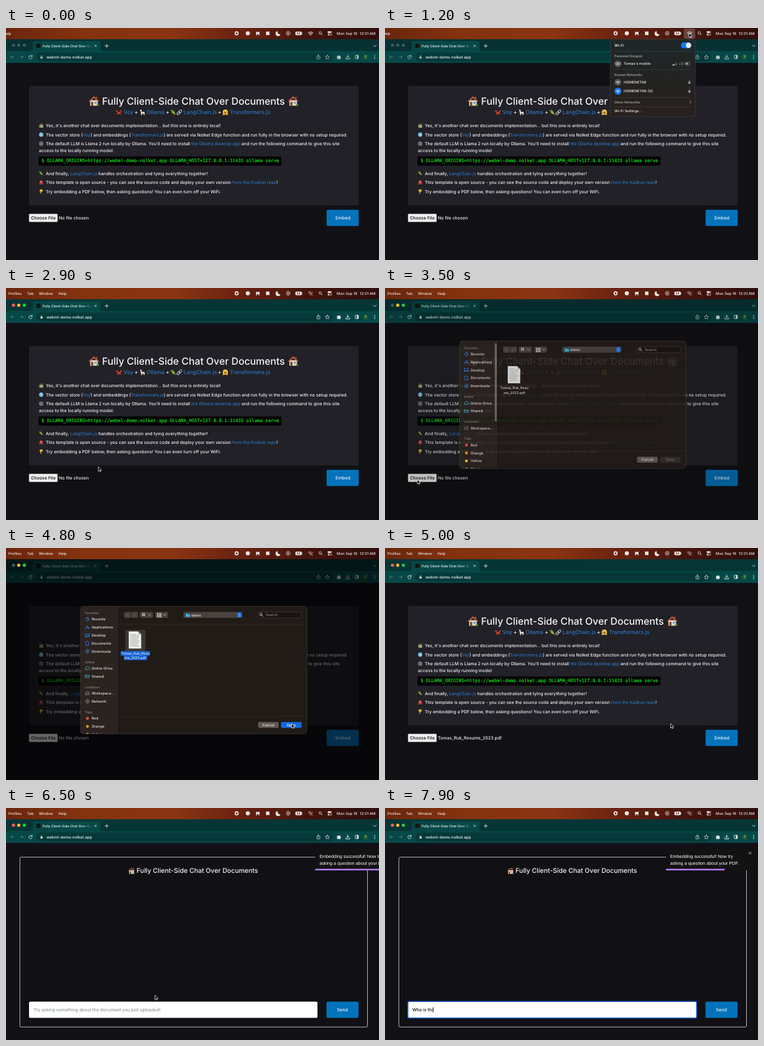
Animation of 600 by 372 pixels, one loop 8 s. Source, as an HTML page:

```html
<!DOCTYPE html>
<html lang="en">
<head>
<meta charset="utf-8">
<title>Client-side chat demo</title>
<style>
html, body { margin: 0; width: 100%; height: 100%; overflow: hidden; background: #111115; }
svg { display: block; width: 600px; height: 372px; font-family: Inter, "Open Sans", sans-serif; font-weight: 500; }
text { white-space: pre; text-rendering: geometricPrecision; }
.link { fill: #2b76c4; }
.mono { font-family: "DejaVu Sans Mono", monospace; font-weight: 400; stroke: #0fe616; stroke-width: .2; }
.toast { font-family: "Liberation Sans", sans-serif; font-weight: 400; }
</style>
</head>
<body>
<svg id="stage" viewBox="0 0 600 372" xmlns="http://www.w3.org/2000/svg"></svg>
<script>
const LOOP = 8000, TOAST_START = 6227, TYPED = "Who is thi";

// Markup helpers
const text = (x, y, s, size = 7, fill = "#f4f4f6", more = "") =>
  `<text x="${x}" y="${y}" font-size="${size}" fill="${fill}" ${more}>${s}</text>`;
const rect = (x, y, w, h, fill, r = 0, more = "") =>
  `<rect x="${x}" y="${y}" width="${w}" height="${h}" rx="${r}" fill="${fill}" ${more}/>`;
const dot = (x, y, r, fill, more = "") => `<circle cx="${x}" cy="${y}" r="${r}" fill="${fill}" ${more}/>`;
const line = (d, color = "#e6e6e6", w = 0.8, more = "") =>
  `<path d="${d}" fill="none" stroke="${color}" stroke-width="${w}" stroke-linecap="round" stroke-linejoin="round" ${more}/>`;
const shape = (d, fill, more = "") => `<path d="${d}" fill="${fill}" ${more}/>`;
const group = (id, body, more = "") => `<g id="${id}" ${more}>${body}</g>`;
const emoji = (id, x, y, size = 8) => `<use href="#${id}" x="${x}" y="${y}" width="${size}" height="${size}"/>`;
const link = s => `<tspan class="link">${s}</tspan>`;
const mid = 'text-anchor="middle"', semi = 'font-weight="600"';

// Emoji on a 10 x 10 grid
const houseArt = rect(1.4, 4.4, 7.2, 5.2, "#ecd9bd") + rect(7, 1, 1.2, 2.5, "#8d4a35") +
  shape("M0 5.2L5 .6 10 5.2 9.2 6 5 2.4 .8 6z", "#b8553e") + rect(2.3, 6, 2, 3.6, "#7c4528") +
  rect(5.5, 5.8, 2.2, 1.9, "#62a6d6") + dot(8.7, 8.8, 1.1, "#4e8c3a");
const emojiArt = {
  house: houseArt,
  garden: houseArt + dot(8.2, 5.4, 1.9, "#57a03f") + rect(7.8, 7, .8, 2.6, "#80502c") + rect(0, 9, 10, 1, "#5ca244"),
  crab: `<ellipse cx="5" cy="6" rx="3.1" ry="2.2" fill="#d0402c"/>` + dot(1.5, 3, 1.4, "#d0402c") + dot(8.5, 3, 1.4, "#d0402c") +
    line("M1.5 3L3 5M8.5 3L7 5M2 7L.8 8.6M3.2 8L2.6 9.4M8 7l1.2 1.6M6.8 8l.6 1.4", "#b5341f", .8) + dot(4, 4, .6, "#222") + dot(6, 4, .6, "#222"),
  llama: shape("M1.8 1.2L2.5 0 3.4 1 4 2.2V4.4H8.2Q9.3 5 9 6.6L8.6 9.8H7.4V7.6H4.4V9.8H3.1L2.4 6 2.2 3 .8 2.5z", "#e6dccb"),
  parrot: shape("M1 2Q2 0 4 1Q7 3 8 7L9.6 9.8 6.5 8.4Q2.5 7.5 1.4 4z", "#55952f") + shape("M3.4 3.2Q6.4 4.6 7.4 8.2Q4 7 3.4 3.2z", "#d2b02f") +
    shape("M.4 3L1.4 1.6 2 3.2z", "#d9a441") + dot(2.5, 2.2, .5, "#222"),
  chain: `<g fill="none" stroke="#a8b1ba" stroke-width="1.3" transform="rotate(-45 5 5)"><rect x="0" y="3.4" width="5.6" height="3.4" rx="1.7"/><rect x="4.6" y="3.4" width="5.6" height="3.4" rx="1.7"/></g>`,
  hug: dot(5, 4.6, 4.4, "#f5c33b") + dot(3.4, 3.6, .6, "#51351a") + dot(6.6, 3.6, .6, "#51351a") + shape("M2.8 5.2H7.2Q6.8 7.2 5 7.2T2.8 5.2z", "#71371b") +
    dot(2, 8.2, 1.6, "#eaa62f") + dot(8, 8.2, 1.6, "#eaa62f"),
  globe: dot(5, 5, 4.6, "#4f9fd0") + line("M.6 5H9.4M5 .5V9.5M1.4 2.6Q5 4 8.6 2.6M1.4 7.4Q5 6 8.6 7.4M5 .5Q1.4 5 5 9.5Q8.6 5 5 .5", "#c5e5f4", .6),
  disc: dot(5, 5, 4.6, "#777a80") + dot(5, 5, 3, "#55575d") + line("M3 3.5L6.8 6.8M6.5 3L3.4 6.6", "#9b9da2", .8),
  octo: dot(5, 4, 3.2, "#cd4046") + line("M2.6 5.6Q2 8.6 .7 8.6M4.2 6.5L3.3 9.2M5.8 6.5L6.7 9.2M7.4 5.6Q8 8.6 9.3 8.6", "#cd4046", 1.5) +
    dot(3.9, 4, .7, "#fff") + dot(6.1, 4, .7, "#fff"),
  down: shape("M3.4 9.4V5.5H2V2.2Q2.2.6 4 .5H7.6Q8.6 2.6 8 5.2H5V9.4Q4.2 10.2 3.4 9.4z", "#f0bd3c") + line("M5.2 4.6V2.6M6.7 4.8V2.8", "#c08a22", .5)
};

const defs = `<defs>
  <linearGradient id="barFill"><stop offset="0" stop-color="#6a260d"/><stop offset=".2" stop-color="#84320f"/><stop offset=".45" stop-color="#8a3413"/><stop offset=".62" stop-color="#6b2310"/><stop offset=".8" stop-color="#45150e"/><stop offset="1" stop-color="#2e0e0c"/></linearGradient>
  <linearGradient id="panelFill" x2="0" y2="1"><stop offset="0" stop-color="#1f2828"/><stop offset=".5" stop-color="#232323"/><stop offset="1" stop-color="#28201d"/></linearGradient>
  <linearGradient id="tabFade"><stop offset=".78" stop-color="#fff"/><stop offset="1" stop-color="#000"/></linearGradient>
  <mask id="tabMask"><rect x="58" y="20" width="81" height="16" fill="url(#tabFade)"/></mask>
  <clipPath id="sheetClip"><rect x="120" y="93.5" width="364" height="204.5" rx="5"/></clipPath>
  ${Object.entries(emojiArt).map(([id, art]) => `<symbol id="${id}" viewBox="0 0 10 10">${art}</symbol>`).join("")}
</defs>`;

const wifi = (x, y, c, k = 1) => `<g transform="translate(${x} ${y}) scale(${k})">` +
  line("M-3.6-1.2Q0-4.4 3.6-1.2M-2.2.5Q0-1.5 2.2.5", c, 1.1) + dot(0, 2, .9, c) + `</g>`;
const lock = (x, y, c = "#cfd6d6") => rect(x - 1.7, y - .5, 3.4, 2.9, c, .5) + line(`M${x - 1} ${y - .5}v-1a1 1 0 0 1 2 0v1`, c, .6);
const magnifier = (x, y, c) => dot(x - .6, y - .6, 2, "none", `stroke="${c}" stroke-width=".8"`) + line(`M${x + .9} ${y + .9}l1.7 1.7`, c, .9);

function menuBar() {
  const w = "#f1eae7", y = 8.5;
  const items = [["Profiles", 4], ["Tab", 34], ["Window", 53], ["Help", 84.5]];
  return rect(0, 0, 600, 18, "url(#barFill)") +
    group("menuOther", text(-4.6, 10.6, "Help", 5.8, w)) +
    group("menuApp", items.map(([s, x]) => text(x, 10.6, s, 5.8, w)).join("")) +
    dot(371, y, 2.4, "none", `stroke="${w}" stroke-width="1.7"`) + dot(389, y, 3.3, w) +
    shape("M402.3 12V5.5L403.6 6.5H406.4L407.7 5V12H406.6V10H403.6V12z", w) + rect(418.2, 5.7, 5.6, 5.6, w) +
    shape("M437 5A4 4 0 1 0 441.5 10 3.8 3.8 0 0 1 437 5z", w) +
    dot(454, y, 3, "none", `stroke="${w}" stroke-width=".8"`) + shape("M453 7v3l2.6-1.5z", w) +
    rect(465.5, 5.8, 10.2, 5.6, w, 1.5) + text(470.6, 10.2, "53", 4.4, "#5a1c10", `${mid} font-weight="700"`) + rect(476.2, 7.6, .8, 2, w, .3) +
    group("wifiHot", rect(480.5, 1, 18.5, 16, "#fff", 2, 'opacity=".2"')) +
    group("wifiOn", wifi(490, 9, w)) +
    group("wifiOff", wifi(490, 9, "#a5827a") + line("M487 5.2L493.4 12.2", "#d0b8b2", .8)) +
    magnifier(506, y, w) +
    rect(517.4, 5.2, 7, 2.8, w, 1.4) + dot(523, 6.6, .9, "#48160f") +
    rect(517.7, 9.3, 6.4, 2.4, "none", 1.2, `stroke="${w}" stroke-width=".6"`) + dot(519, 10.5, 1, w) +
    text(532, 10.6, "Mon Sep 18", 5.95, w) + text(569, 10.6, "12:01 AM", 5.95, w);
}

function browserBar() {
  const c = "#dbe6e5", dim = "#5f8684", y = 46.5, teal = "#064847";
  const tools =
    line("M41.6 44.9A2.7 2.7 0 1 0 42.1 47.4M42.1 43.6V45.6H40", c, .9) + lock(57.2, y) +
    line("M501 45.6h-1V49.4h5V45.6h-1M502.5 47.4V43M501.2 44.2l1.3-1.3 1.3 1.3", c, .7) +
    line("M517 43.3l1 2.2 2.4.2-1.8 1.6.6 2.4-2.2-1.3-2.2 1.3.6-2.4-1.8-1.6 2.4-.2z", c, .7) +
    shape("M532.6 44.6H534.4A1.2 1.2 0 0 1 536.6 44.6H538V46A1.2 1.2 0 0 1 538 48.3V49.7H532.6z", c) +
    line("M549.7 43.2v4M547.9 45.6l1.8 1.8 1.8-1.8M546.6 48v1.6h6.2V48", c, 1) +
    rect(561.7, 43.7, 5.2, 5.4, "none", .6, `stroke="${c}" stroke-width=".9"`) + rect(564.4, 43.7, 2.5, 5.4, c) +
    [-2.4, 0, 2.4].map(d => dot(593, y + d, .8, c)).join("");
  return `<rect id="strip" y="18" width="600" height="20"/>` +
    rect(0, 37, 600, 19, teal) + shape("M41 37Q43 37 43 35V24Q43 21 46 21H149Q152 21 152 24V35Q152 37 154 37z", teal) +
    rect(48.5, 25, 7, 7, "#161513", 1) +
    `<g mask="url(#tabMask)">${text(59, 30.5, "Fully Client-Side Chat Over Documents", 5.45, "#f0f5f5")}</g>` +
    line("M142.6 27.1l3 3m0-3l-3 3", c, .8) + line("M159.3 28.7h5.4M162 26v5.4", c, .9) + line("M591 27.6l2.3 2.2 2.3-2.2", c, .9) +
    rect(49, 39.6, 476, 13.8, "#053939", 6.9) +
    line(`M12.5 ${y}H7.6M9.8 44.2L7.5 ${y}l2.3 2.3M22.5 ${y}h4.9M25.2 44.2l2.3 2.3-2.3 2.3`, dim, .8) +
    group("tools", tools) +
    text(65, 48.8, "webml-demo.nolket.app", 6.3, "#eef4f4") +
    dot(578.5, y, 4.3, "#1d5b32") + text(578.5, 48.3, "T", 4.8, "#e8f3ea", mid);
}

function introPage() {
  const white = "#f4f4f6";
  const rows = [
    ["garden", 158.6, "Yes, it's another chat over documents implementation... but this one is entirely local!"],
    ["globe", 173.5, `The vector store (${link("Voy")}) and embeddings (${link("Transformers.js")}) are served via Nolket Edge function and run fully in the browser with no setup required.`],
    ["disc", 188, `The default LLM is Llama 2 run locally by Ollama. You'll need to install ${link("the Ollama desktop app")} and run the following command to give this site`],
    ["parrot", 235.5, `And finally, ${link("LangChain.js")} handles orchestration and tying everything together!`],
    ["octo", 250, `This template is open source - you can see the source code and deploy your own version ${link("from the Kodnar repo")}!`],
    ["down", 264.6, "Try embedding a PDF below, then asking questions! You can even turn off your WiFi."]
  ];
  const heads = [["crab", 177, "Voy", 189], ["llama", 214.5, "Ollama", 226], ["chain", 274, "LangChain.js", 285.5], ["hug", 348, "Transformers.js", 360]];
  return rect(37, 93, 530, 191.5, "#212127", 2) +
    emoji("house", 133, 108.3, 17) + emoji("house", 453.5, 108.3, 17) +
    text(301.6, 122.6, "Fully Client-Side Chat Over Documents", 15.8, white, mid) +
    heads.map(([e, ex, s, x]) => emoji(e, ex, 130.3, 9.6) + text(x, 138.4, s, 8.7, "#2b76c4")).join("") +
    emoji("parrot", 264.5, 130.3, 9.6) + [209.5, 260, 343.6].map(x => text(x, 138.4, "+", 8.7, white, mid)).join("") +
    rows.map(([e, y, s]) => emoji(e, 52.8, y - 6.3, 7.6) + text(64, y, s)).join("") +
    text(53, 199.1, "access to the locally running model:") +
    rect(52.5, 206, 390.5, 14.4, "#000", 2) +
    text(57, 215.2, "$ OLLAMA_ORIGINS=https://webml-demo.nolket.app OLLAMA_HOST=127.0.0.1:11435 ollama serve", 7.3, "#0fe616", 'class="mono"') +
    rect(37, 298, 46, 13, "#efefef", 1.3, 'stroke="#767676" stroke-width=".5"') + text(60, 307, "Choose File", 7.05, "#050505", mid) +
    `<text id="fileName" x="85" y="307" font-size="7" fill="${white}"></text>` +
    rect(515.7, 291.6, 51.6, 25.8, "#0273bb", 2) + text(542, 307, "Embed", 7.2, white, mid);
}

function chatPage() {
  return rect(22.3, 78.8, 559.2, 272.4, "none", 2, 'stroke="#c9c9cd" stroke-width=".9"') +
    emoji("house", 196.5, 95, 11) + text(210, 104.2, "Fully Client-Side Chat Over Documents", 10.5) +
    rect(37, 310.5, 464, 26, "#fff", 2) +
    group("focusRing", rect(36.8, 310.3, 464.4, 26.4, "none", 2, 'stroke="#1b63cf" stroke-width="1.6"')) +
    group("hint", text(44, 326.2, "Try asking something about the document you just uploaded!", 7, "#8d9097")) +
    `<text id="typed" x="44" y="326.2" font-size="7" fill="#0a0a0a"></text>` +
    `<rect id="caret" y="319.4" width=".8" height="8.6" fill="#000"/>` +
    rect(515.5, 310.5, 51.5, 26, "#0273bb", 2) + text(541.2, 326.2, "Send", 7.2, "#f4f4f6", mid) +
    group("toast", rect(452, 65.8, 142, 34.2, "#121213", 2) +
      text(458.7, 79.6, "Embedding successful! Now try", 7.25, "#fff", 'class="toast"') +
      text(458.7, 90.6, "asking a question about your PDF.", 7.25, "#fff", 'class="toast"') +
      line("M585.4 70.6l3.6 3.6m0-3.6l-3.6 3.6", "#c6c6c8", .9) +
      `<rect id="progress" x="452" y="97.5" height="2.5" fill="#b47cf0"/>`);
}

function wifiPanel() {
  const w = "#f0ebe9", g = "#a5a09d", grey = "#545251";
  const rule = y => rect(369, y, 123, .5, "#fff", 0, 'opacity=".17"');
  const badge = (y, c) => dot(374.7, y, 5.6, c);
  return rect(362.5, 18, 136.5, 124, "url(#panelFill)", 4, 'stroke="#474443" stroke-width=".6"') +
    text(369, 29.8, "Wi-Fi", 5.8, w, semi) +
    `<rect id="track" x="476" y="23" width="17" height="9.6" rx="4.8"/><circle id="knob" cy="27.8" r="4.2" fill="#f0f0f2"/>` +
    [37.5, 66.5, 111, 126].map(rule).join("") +
    text(369, 47, "Personal Hotspot", 5.4, g, semi) + badge(57.3, grey) +
    dot(373, 57.3, 1.7, "none", `stroke="${w}" stroke-width=".8"`) + dot(376.3, 57.3, 1.7, "none", `stroke="${w}" stroke-width=".8"`) +
    text(384, 59.4, "Tomas's mobile", 5.8, w) +
    [0, 1, 2, 3].map(i => rect(462 + i * 2, 58.8 - i, 1.3, 1.4 + i, i < 2 ? w : "#6d6865", .3)).join("") +
    text(472.8, 59.3, "LTE", 4.6, g) + rect(483, 55, 7.6, 4.3, "none", 1, `stroke="${g}" stroke-width=".6"`) + rect(483.8, 55.8, 3.6, 2.7, g, .4) +
    text(369, 76.8, "Known Networks", 5.4, g, semi) +
    badge(87, grey) + wifi(374.7, 87.4, w, .8) + text(384, 89.1, "HOMENET48", 5.8, w) + lock(489.7, 86.8, g) +
    badge(101.3, "#1479f0") + wifi(374.7, 101.7, "#fff", .8) + text(384, 103.4, "HOMENET48-5G", 5.8, w) + lock(489.7, 101.1, g) +
    text(369, 120.9, "Other Networks", 5.4, g, semi) + line("M490.3 116.6l2.1 2.2-2.1 2.2", g, .9) +
    text(369, 135.3, "Wi-Fi Settings...", 5.8, w);
}

function fileSheet() {
  const w = "#e9e4e1", g = "#87807c", blue = "#2c8df2", cyan = "#42b3c6";
  const icons = {
    clock: "M131-3a3 3 0 1 0 .1 0M131-1.6V0h1.4", apps: "M128.3 2.6L131-2.8 133.7 2.6M127.8 1H134.2",
    screen: "M128-2.3h6V2.3h-6zM128 1h6", page: "M128.8-3h3l1.6 1.6V3h-4.6z", down: "M131-3a3 3 0 1 0 .1 0M131-1.4V1.4M129.9.4L131 1.5 132.1.4",
    cloud: "M129 2h4.4a1.5 1.5 0 0 0 0-3 2.4 2.4 0 0 0-4.6-.3A1.7 1.7 0 0 0 129 2z", folder: "M128-2.2h2l.8.8H134V2.2H128zM128-.4h6",
    disk: "M128 .2L129-2.4h4l1 2.6V2.4h-6zM128 .2h6", net: "M131-3a3 3 0 1 0 .1 0M128 0h6M131-3V3"
  };
  const head = (s, y) => text(127, y + 1.8, s, 5, g, semi);
  const row = (s, y, icon, c) => line(icons[icon], c, .8, `transform="translate(0 ${y})"`) + text(137.7, y + 2.1, s, 5.8, w);
  const tag = (s, y, c) => dot(131, y, 2.3, c) + text(137.7, y + 2.1, s, 5.8, w);
  const button = (x, wd, y = 102.5) => rect(x, y, wd, 9.6, "#49423f", 1.8);
  const arrows = x => line(`M${x} 106.5l1.6 1.6 1.6-1.6`, w, .7);
  const grid = (x, rows) => [0, 1, 2].slice(0, rows).map(r => [0, 1, 2].slice(0, rows).map(c => rect(x + c * 2.6, 104.5 + r * 2.5, 1.8, 1.7, w)).join("")).join("");
  const favorites = [["Recents", "clock"], ["Applications", "apps"], ["Desktop", "screen"], ["Documents", "page"], ["Downloads", "down"]];
  const tags = [["Red", "#ff4b44"], ["Orange", "#fd9512"], ["Yellow", "#fccd15"], ["Green", "#35c84b"]];
  return `<g clip-path="url(#sheetClip)">` +
    rect(120, 93.5, 364, 204.5, "#211b18") + rect(120, 93.5, 61.5, 204.5, "#2b2320") +
    rect(181.5, 93.5, .6, 204.5, "#110d0c") + rect(182, 121.8, 302, .6, "#39312d") + rect(182, 269.8, 302, .6, "#39312d") +
    head("Favorites", 104.3) + favorites.map(([s, i], n) => row(s, 114.3 + n * 12.8, i, blue)).join("") +
    head("Online", 182.7) + row("Online Drive", 193, "cloud", cyan) + row("Shared", 205.7, "folder", cyan) +
    head("Locations", 222.8) + row("Workspace...", 233, "disk", g) + group("network", row("Network", 245.8, "net", g)) +
    group("tags", head("Tags", 250) + tags.map(([s, c], n) => tag(s, 260.3 + n * 12.7, c)).join("")) +
    group("scroller", rect(176.6, 97, 3.2, 125, "#756d69", 1.6)) +
    button(190, 10.6) + button(201.2, 10.8) + line("M196 105.5l-1.7 1.8 1.7 1.8M205.9 105.5l1.7 1.8-1.7 1.8", g, .8) +
    button(215.3, 21) + grid(219, 2) + arrows(229.3) + button(240, 20.5) + grid(243, 3) + arrows(253.6) +
    button(285.3, 94.7) + shape("M289 105.2h2.6l.8.8h3.6v4.4h-7z", "#3aaee0") + text(298, 109.5, "demo", 5.9, w) +
    rect(371.8, 103.3, 7.2, 8, "#1769d8", 1.5) + line("M374 106.4l1.4-1.4 1.4 1.4M374 108.3l1.4 1.4 1.4-1.4", "#fff", .7) +
    rect(405, 102.5, 70, 9.8, "#191412", 1.8, 'stroke="#4b4441" stroke-width=".6"') + magnifier(410.6, 107.2, w) + text(417.5, 109.4, "Search", 5.8, g) +
    group("picked", rect(191.8, 131.2, 32.4, 34, "#3d3632", 2) + rect(184.4, 165.2, 47.4, 7.6, "#1665d6", 1.5) + rect(189.5, 172, 37.5, 7.8, "#1665d6", 1.5)) +
    shape("M197.5 133.8h15l5 5V161.2h-20z", "#eeeeec") + shape("M212.5 133.8v5h5z", "#bdbdbb") +
    [...Array(10)].map((_, i) => rect(200, 138 + i * 2.1, i < 1 ? 9 : 12 + i * 7 % 4, .7, "#9b9b99")).join("") +
    text(208, 170.9, "Tomas_Ruk_Resu", 5.45, w, mid) + text(208, 178, "me_2023.pdf", 5.45, w, mid) +
    rect(405.5, 279, 33, 9.4, "#615955", 1.8) + text(422, 285.8, "Cancel", 5.8, w, mid) +
    `<rect id="openFill" x="442.5" y="279" width="33" height="9.4" rx="1.8"/><text id="openText" x="459" y="285.8" font-size="5.8" ${mid}>Open</text>` +
    `</g>` + rect(120, 93.5, 364, 204.5, "none", 5, 'stroke="#4d4541" stroke-width=".6"');
}

const lights = [["closeDot", 12], ["shrinkDot", 20.5], ["growDot", 29.5]];
document.getElementById("stage").innerHTML = defs + rect(0, 0, 600, 372, "#111115") +
  group("intro", introPage()) + group("chat", chatPage()) + browserBar() +
  `<rect id="dim" y="18" width="600" height="354" fill="#000"/>` +
  lights.map(([id, x]) => `<circle id="${id}" cx="${x}" cy="27.6" r="2.6"/>`).join("") +
  menuBar() + group("sheet", fileSheet()) + group("panel", wifiPanel()) +
  group("cursor", shape("M0 0V7.2L1.7 5.7 2.8 8.1 4 7.5 2.9 5.2H5.2z", "#000", 'stroke="#fff" stroke-width=".7" stroke-linejoin="round"'));

const el = {};
document.querySelectorAll("#stage [id]").forEach(n => el[n.id] = n);
const set = (id, name, value) => el[id].setAttribute(name, value);
const show = (id, on) => set(id, "visibility", on ? "visible" : "hidden");
const clamp = v => Math.max(0, Math.min(1, v));
const smooth = p => p * p * (3 - 2 * p);
const outCubic = p => 1 - (1 - p) ** 3;

// Interpolates rows of [time, ...values]
function along(keys, t, ease) {
  if (t <= keys[0][0]) return keys[0].slice(1);
  for (let i = 1; i < keys.length; i++) {
    const a = keys[i - 1], b = keys[i];
    if (t < b[0]) {
      const p = ease((t - a[0]) / (b[0] - a[0]));
      return a.slice(1).map((v, n) => v + (b[n + 1] - v) * p);
    }
  }
  return keys[keys.length - 1].slice(1);
}

const pointer = [
  [400, 450, 385], [1100, 489, 8], [1400, 489, 8], [1900, 484, 25], [2350, 484, 25],
  [2700, 300, 255], [3050, 52, 307], [3600, 52, 307], [4200, 207, 147], [4400, 207, 147],
  [4750, 459.5, 281.5], [5100, 459.5, 281.5], [5500, 540, 304], [5850, 540, 304],
  [6400, 239.5, 300], [6550, 239.5, 300], [6750, 220, 321]
];
const bounce = [[0, 1333], [.6, -11], [.75, 4.4], [.9, -2.2], [1, 0]];

function draw(t) {
  const active = t >= 2700, chat = t >= 6200, sheet = t >= 3250 && t < 4950;
  show("menuOther", !active);
  show("menuApp", active);
  set("strip", "fill", active ? "#063536" : "#073132");
  set("tools", "opacity", active ? 1 : .8);
  ["#ff5f57", "#febc2e", "#28c840"].forEach((c, i) =>
    set(lights[i][0], "fill", active && !(sheet && i === 0) ? c : "#3a5a59"));

  const panel = t >= 1200 && t < 2600, off = smooth(clamp((t - 2150) / 150));
  show("panel", panel);
  show("wifiHot", panel);
  show("wifiOn", t < 2250);
  show("wifiOff", t >= 2250);
  set("knob", "cx", 488.2 - 7.4 * off);
  set("track", "fill", off < .5 ? "#1877f2" : "#545251");

  const drop = clamp((t - 3250) / 500), leave = 1 - clamp((t - 4850) / 100);
  show("sheet", sheet);
  set("sheet", "opacity", Math.min(1, drop * 1.75) * leave);
  set("sheet", "transform", `translate(0 ${-17 * (1 - drop)})`);
  set("dim", "opacity", .58 * drop ** 1.6 * leave);
  set("network", "opacity", t >= 3700 ? 1 : 0);
  set("tags", "transform", `translate(0 ${t >= 3700 ? 13 : 0})`);
  set("scroller", "opacity", 1 - clamp((t - 3900) / 250));
  const picked = t >= 4250;
  set("picked", "opacity", picked ? 1 : 0);
  set("openFill", "fill", picked ? "#1468dc" : "#342d2a");
  set("openText", "fill", picked ? "#fff" : "#7c7470");

  show("intro", !chat);
  el.fileName.textContent = t >= 4850 ? "Tomas_Ruk_Resume_2023.pdf" : "No file chosen";

  show("chat", chat);
  const age = t - TOAST_START, focused = t >= 6800;
  set("toast", "transform", `translate(${along(bounce, age / 700, outCubic)[0]} 0)`);
  set("progress", "width", 142 * (1 - clamp(age / 5000)));
  const typed = TYPED.slice(0, Math.max(0, Math.floor((t - 6950) / 95) + 1));
  el.typed.textContent = typed;
  show("hint", chat && !typed);
  show("focusRing", focused);
  show("caret", focused);
  set("caret", "x", 44.2 + (typed ? el.typed.getComputedTextLength() : 0));

  const [x, y] = along(pointer, t, smooth);
  show("cursor", t >= 400 && t < 6900);
  set("cursor", "transform", `translate(${x} ${y})`);
}

const begin = performance.now();
function tick() {
  draw((performance.now() - begin) % LOOP);
  requestAnimationFrame(tick);
}
tick();
</script>
</body>
</html>
```
